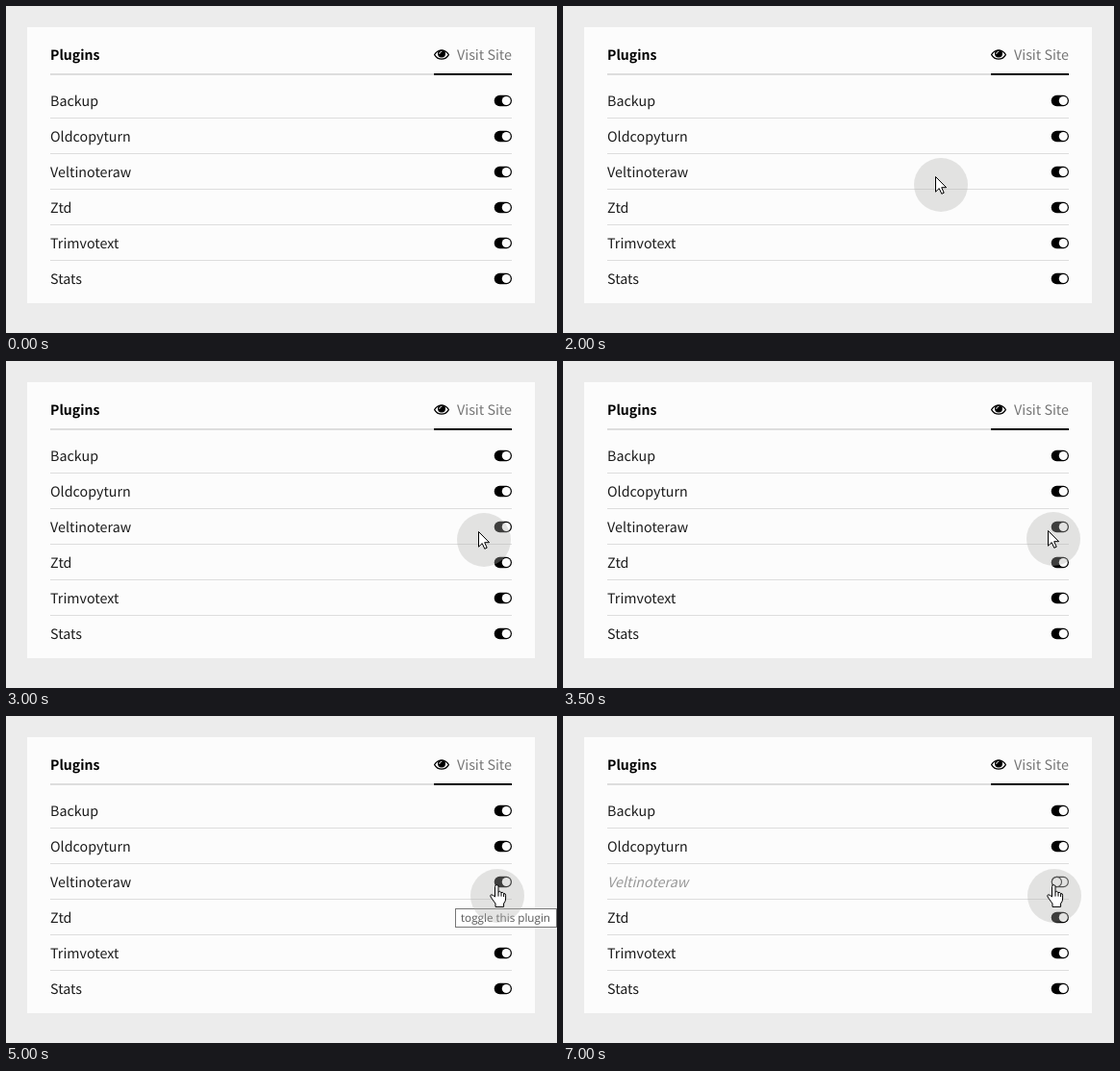
An HTML page that plays this animation: 573 by 340 pixels, repeating every 8 s.

```html
<!DOCTYPE html>
<html lang="en">
<head>
<meta charset="utf-8">
<title>Plugin list</title>
<style>
  html, body { margin: 0; width: 100%; height: 100%; overflow: hidden; background: #ececec; }
  svg { display: block; }
  text { font: 14.32px "Noto Sans CJK SC", "Noto Sans CJK JP", "Noto Sans CJK", sans-serif; fill: #1c1c1c; text-rendering: geometricPrecision; }
  .title { font-weight: 600; font-size: 14.1px; fill: #000; }
  .visit { fill: #777; }
  .disabled { font-style: italic; fill: #999; }
  #tip text { font: 11.66px "Open Sans", sans-serif; fill: #575757; }
  .pointer { fill: #fff; stroke: #000; stroke-linejoin: round; }
</style>
</head>
<body>
<svg width="573" height="340" viewBox="0 0 573 340">
  <defs>
    <g id="on">
      <rect width="18.3" height="11.4" rx="5.7"/>
      <circle cx="12.6" cy="5.7" r="4.5" fill="#fcfcfc"/>
    </g>
    <g id="off" fill="none" stroke="#222" stroke-width="1.1">
      <rect x=".6" y=".6" width="17.1" height="10.2" rx="5.1"/>
      <circle cx="5.7" cy="5.7" r="5.1"/>
    </g>
  </defs>

  <rect x="22" y="22" width="528" height="287" fill="#fcfcfc"/>
  <text class="title" x="46" y="56">Plugins</text>
  <text class="visit" x="469" y="56">Visit Site</text>
  <g transform="translate(453 50.6)">
    <path d="M-7.4 0C-4-6.1 4-6.1 7.4 0C4 6.1-4 6.1-7.4 0Z" fill="none" stroke="#000" stroke-width="1.2" stroke-linejoin="round"/>
    <circle cy="-1" r="4"/>
    <path d="M-2.3-1A2.3 2.3 0 0 1 0-3.3" fill="none" stroke="#fcfcfc" stroke-width=".9" stroke-linecap="round"/>
  </g>
  <rect x="46" y="70" width="399" height="2" fill="#ddd"/>
  <rect x="445" y="70" width="81" height="2"/>

  <g id="rows"></g>

  <g id="tip">
    <rect x="467.5" y="200.5" width="105" height="19" fill="#fff" stroke="#767676"/>
    <text x="473" y="214">toggle this plugin</text>
  </g>

  <g id="cursor">
    <circle r="28" fill="#b1b1af" fill-opacity=".35"/>
    <path id="arrow" class="pointer" transform="translate(-6 -9)"
      d="M.5.5V16.2L4.2 12.6 6.8 18.3 9.2 17.2 6.7 11.7H11.6Z"/>
    <path id="hand" class="pointer" transform="translate(-8 -12)"
      d="M5.5 13V2.5Q5.5.7 7.3.7T9 2.5V8Q10.6 6.4 12 8.6Q13.8 7.7 14.6 9.6Q16.6 9.2 16.6 11.2V15Q16.6 18 14.6 20V23.4H6V20Q4 17.5 1 13Q.2 11 1.8 10.8Q3.5 11 5.5 13ZM9 8V12.6M12 8.6V12.6M14.6 9.6V13"/>
  </g>
</svg>
<script>
const LOOP = 8000;
const names = ["Backup", "Oldcopyturn", "Veltinoteraw", "Ztd", "Trimvotext", "Stats"];
const TOGGLED = 2;

// start time, centre x, centre y
const stops = [
  [1500, 392, 208],
  [2000, 393, 186],
  [2500, 433, 185],
  [3000, 497, 186],
  [3500, 510, 185],
  [4000, 511, 187]
];

const byId = id => document.getElementById(id);
const show = (id, visible) => byId(id).setAttribute("visibility", visible ? "visible" : "hidden");

byId("rows").innerHTML = names.map((name, i) => {
  const y = 37 * i;
  const line = i < names.length - 1
    ? `<rect x="46" y="${y + 116}" width="480" height="1" fill="#ddd"/>` : "";
  return `<text id="name${i}" x="46" y="${y + 104}">${name}</text>
    <use id="switch${i}" href="#on" x="507.7" y="${y + 92.8}"/>${line}`;
}).join("");

function draw(now) {
  const t = now % LOOP;
  const stop = stops.filter(s => s[0] <= t).pop();
  byId("cursor").setAttribute("display", stop ? "inline" : "none");
  if (stop) byId("cursor").setAttribute("transform", `translate(${stop[1]} ${stop[2]})`);
  show("arrow", t < 4000);
  show("hand", t >= 4000);
  show("tip", t >= 5000 && t < 6500);
  byId("switch" + TOGGLED).setAttribute("href", t < 6500 ? "#on" : "#off");
  byId("name" + TOGGLED).setAttribute("class", t < 7000 ? "" : "disabled");
}

const start = performance.now();
function frame() {
  draw(performance.now() - start);
  requestAnimationFrame(frame);
}
frame();
</script>
</body>
</html>
```
